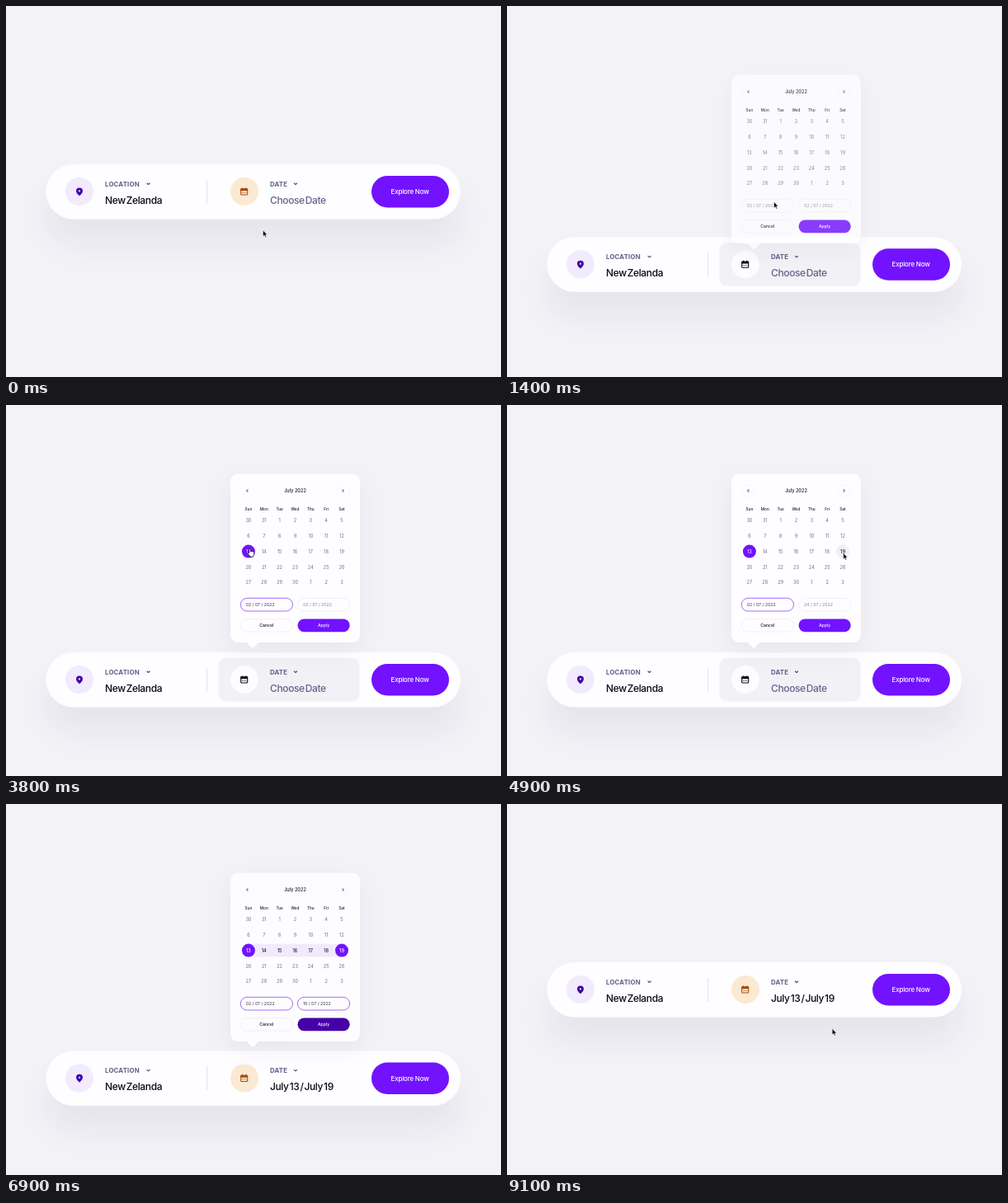
An HTML page for the animation above (9200 ms loop, 600 px wide and 450 px high).

```html
<!DOCTYPE html>
<html lang="en">
<head>
<meta charset="utf-8">
<title>Travel date picker</title>
<style>
  html, body { margin: 0; width: 100%; height: 100%; overflow: hidden; background: #f3f2f7; }
  svg { display: block; width: 600px; height: 450px; font-family: Inter, "Liberation Sans", sans-serif; }
  #panel { filter: drop-shadow(0 30px 17px rgba(30, 20, 60, .055)); }
  #sheet { filter: drop-shadow(0 10px 14px rgba(30, 20, 60, .05)); }
  .value { font-size: 12px; font-weight: 500; letter-spacing: -.38px; word-spacing: -1.8px; }
  .label { font-size: 7.8px; font-weight: 700; letter-spacing: .2px; fill: #62608a; }
  .mid { text-anchor: middle; }
  .chevron { fill: none; stroke: #4a4870; stroke-width: 1.1; stroke-linecap: round; stroke-linejoin: round; }
  .small { font-size: 5.1px; font-weight: 500; text-anchor: middle; }
  .field { fill: #fefdff; stroke: #efedf3; stroke-width: .8; }
  .date { font-size: 5.2px; }
</style>
</head>
<body>
<svg viewBox="0 0 600 450">
  <defs>
    <g id="calendar">
      <rect x="-4" y="-3.4" width="8" height="7.2" rx=".7" fill="none" stroke="currentColor" stroke-width="1.1"/>
      <path d="M-4.3-3.6H4.3V-1H-4.3ZM-2.8-4.8h1.3v2h-1.3ZM1.5-4.8h1.3v2H1.5ZM-2.5.7h1v1h-1ZM-.5.7h1v1h-1ZM1.5.7h1v1h-1Z" fill="currentColor"/>
    </g>
  </defs>

  <g id="bar">
    <rect id="panel" x="48.5" y="192" width="502.5" height="66.5" rx="33.25" fill="#fefdff"/>
    <rect id="active" x="257.5" y="199" width="171" height="52.5" rx="9" fill="#f2f1f6"/>
    <circle cx="89" cy="225" r="17" fill="#f2eafd"/>
    <path d="M89 230.2C87 228.4 85 226.6 85 224.4a4 4 0 0 1 8 0C93 226.6 91 228.4 89 230.2Z" fill="#4304a6"/>
    <circle cx="89" cy="224.4" r="1.1" fill="#f2eafd"/>
    <text class="label" x="120" y="218.7">LOCATION</text>
    <path class="chevron" d="M171 215l1.6 1.5 1.6-1.5M349.4 215l1.6 1.5 1.6-1.5"/>
    <text class="value" x="120" y="239.6" fill="#0b0912">New Zelanda</text>
    <path d="M243.5 211V240" stroke="#e3e1e9" stroke-width="1"/>
    <circle cx="289" cy="225" r="17" fill="#fce9d2"/>
    <use href="#calendar" x="288.7" y="225.2" color="#a64a10"/>
    <g id="activeIcon">
      <circle cx="289" cy="225" r="17" fill="#fdfcff"/>
      <use href="#calendar" x="288.7" y="225.2" color="#0d0b18"/>
    </g>
    <text class="label" x="320" y="218.7">DATE</text>
    <text class="value" id="chosen" x="320" y="239.6"></text>
    <rect x="443" y="206" width="94" height="38.5" rx="19.25" fill="#7212ff"/>
    <text class="mid" x="489.6" y="228.2" font-size="8" font-weight="500" letter-spacing="-.2" fill="#fff">Explore Now</text>
  </g>

  <g id="popup">
    <path id="sheet" fill="#fefdff" d="M281 83.5H420a9 9 0 0 1 9 9V279a9 9 0 0 1-9 9H306.5L300 294.5q-1 1-2 0L291.5 288H281a9 9 0 0 1-9-9V92.500a9 9 0 0 1 9-9Z"/>
    <g fill="none" stroke="#f5f4f8" stroke-width=".7">
      <circle cx="292.500" cy="104" r="7.5"/><circle cx="408.500" cy="104" r="7.5"/>
    </g>
    <path d="M293.2 102.300l-1.600 1.700 1.600 1.700M407.800 102.300l1.600 1.700-1.600 1.700" fill="none" stroke="#1c1930" stroke-width=".9"/>
    <text class="mid" x="350.5" y="106" font-size="5.6" font-weight="500" fill="#1c1930">July 2022</text>
    <g id="grid"></g>
    <rect class="field" id="from" x="284.300" y="234.300" width="63.200" height="15.700" rx="7.850"/>
    <rect class="field" id="to" x="353.500" y="234.300" width="63.200" height="15.700" rx="7.850"/>
    <text class="date" id="fromText" x="290.700" y="244.100">02 / 07 / 2022</text>
    <text class="date" id="toText" x="360" y="244.100"></text>
    <rect class="field" x="284.300" y="259.700" width="63.200" height="15.300" rx="7.650"/>
    <text class="small" x="315.800" y="269.200" fill="#0d0b18">Cancel</text>
    <rect id="apply" x="353.500" y="259.500" width="63.200" height="15.700" rx="7.850"/>
    <text class="small" x="385" y="269.200" fill="#fff">Apply</text>
  </g>

  <g id="cursor" stroke-linejoin="round">
    <path id="arrow" d="M0 0V7.400L1.700 5.900 2.900 8.600 4.100 8.100 3 5.500H5.200Z" fill="#08070c" stroke="#fff" stroke-width=".5"/>
    <path id="hand" d="M-.9 5.500V.400a.8.8 0 0 1 1.600 0V3.300q.8-.7 1.500 0 .8-.6 1.500.100 1.200-.4 1.500.7V6.300q0 1.500-.9 2.400V9.600H.2V8.800L-2.900 5.300q.2-1.200 1.200-.6Z" fill="#fff" stroke="#15131f" stroke-width=".8"/>
  </g>
</svg>
<script>
  const LOOP = 9200, PURPLE = '#7212ff';
  const $ = id => document.getElementById(id);
  const grid = $('grid');

  function add(tag, attrs, text = '') {
    const el = document.createElementNS('http://www.w3.org/2000/svg', tag);
    for (const key in attrs) el.setAttribute(key, attrs[key]);
    el.textContent = text;
    grid.append(el);
    return el;
  }
  const set = (id, attrs) => { for (const key in attrs) $(id).setAttribute(key, attrs[key]); };
  const colX = c => 293.9 + 18.85 * c;
  const rowY = r => 140.2 + 18.8 * r;
  const ramp = (t, start, length) => Math.min(1, Math.max(0, (t - start) / length));
  const easeOut = p => 1 - (1 - p) ** 3;
  const easeInOut = p => p * p * (3 - 2 * p);
  const fadeBetween = (t, start, end) => ramp(t, start, 120) * (1 - ramp(t, end, 250));

  // Calendar: hover discs, range band, end discs, then the numbers on top.
  const disc = (col, row, fill) => add('circle', { cx: colX(col), cy: rowY(row) - .2, r: 8, fill });
  const hovers = [[0, 3, 2480, 2640], [0, 2, 2620, 3300], [4, 3, 4430, 4600], [6, 2, 4690, 5400]]
    .map(([col, row, start, end]) => ({ el: disc(col, row, '#f0eff4'), start, end }));
  const band = add('rect', { x: colX(0), y: rowY(2) - 8, width: 18.85 * 6, height: 15.6, fill: '#f1eafc' });
  const firstDisc = disc(0, 2, PURPLE), lastDisc = disc(6, 2, PURPLE);

  'Sun Mon Tue Wed Thu Fri Sat'.split(' ').forEach((name, c) =>
    add('text', { class: 'mid', x: colX(c), y: 127.6, 'font-size': 4.7, 'font-weight': 500, fill: '#1c1930' }, name));

  const days = [];
  for (let i = 0; i < 35; i++) {
    const n = i - 1;
    days.push(add('text', {
      class: 'mid', x: colX(i % 7), y: rowY(Math.floor(i / 7)) + 2, 'font-size': 5.6, fill: '#706e84'
    }, n < 1 ? n + 31 : n > 30 ? n - 30 : n));
  }

  // Pointer stops: time, x, y.
  const stops = [
    [0, 311.5, 272], [800, 323.5, 237.5], [2150, 323.5, 237.5], [2800, 295.5, 174.5],
    [4150, 295.5, 174.5], [4480, 369, 197], [4850, 407.6, 179.5],
    [5700, 407.6, 179.5], [6500, 394.2, 272.5], [LOOP, 394.2, 272.5]
  ];
  function pointerAt(t) {
    const i = stops.findIndex(stop => stop[0] > t);
    const [t0, x0, y0] = stops[i - 1], [t1, x1, y1] = stops[i];
    const p = easeInOut((t - t0) / (t1 - t0));
    return [x0 + (x1 - x0) * p, y0 + (y1 - y0) * p];
  }

  function draw(t) {
    const open = easeOut(ramp(t, 1150, 580)) - easeOut(ramp(t, 6900, 600));
    set('bar', { transform: `translate(0 ${108 * open})` });
    set('popup', { opacity: open });

    const active = ramp(t, 450, 250) * (1 - ramp(t, 6750, 100));
    set('active', { opacity: active });
    set('activeIcon', { opacity: active });

    const applied = t >= 6800;
    $('chosen').textContent = applied ? 'July 13 / July 19' : 'Choose Date';
    set('chosen', { fill: applied ? '#0b0912' : '#65638c' });

    const picked = t >= 3300, ranged = t >= 5400;
    for (const h of hovers) h.el.setAttribute('opacity', fadeBetween(t, h.start, h.end));
    firstDisc.setAttribute('opacity', ramp(t, 3250, 150));
    lastDisc.setAttribute('opacity', ramp(t, 5350, 150));
    band.setAttribute('opacity', ramp(t, 5350, 200));
    for (let i = 14; i <= 20; i++) {
      const selected = i === 14 ? picked : i === 20 && ranged;
      const strong = ranged || (i === 20 && t >= 4750);
      days[i].setAttribute('fill', selected ? '#fff' : strong ? '#1c1930' : '#706e84');
      days[i].setAttribute('font-weight', strong ? 500 : 400);
    }

    const fieldLook = (id, on) => {
      $(id).style.stroke = on ? '#8a4af5' : '';
      set(id + 'Text', { fill: on ? '#3a3750' : '#858398' });
    };
    fieldLook('from', picked);
    fieldLook('to', ranged);
    $('toText').textContent = `${ranged ? '19' : t >= 4480 ? '24' : '02'} / 07 / 2022`;
    set('apply', { fill: t >= 6400 ? '#4500a8' : PURPLE });

    const [x, y] = pointerAt(t);
    const hand = t >= 2480 && t < 4250;
    set('cursor', { transform: `translate(${x} ${y})`, opacity: t >= 6600 && t < 7000 ? 0 : 1 });
    set('hand', { opacity: hand ? 1 : 0 });
    set('arrow', { opacity: hand ? 0 : 1 });
  }

  const begin = performance.now();
  function tick() {
    draw((performance.now() - begin) % LOOP);
    requestAnimationFrame(tick);
  }
  tick();
</script>
</body>
</html>
```
